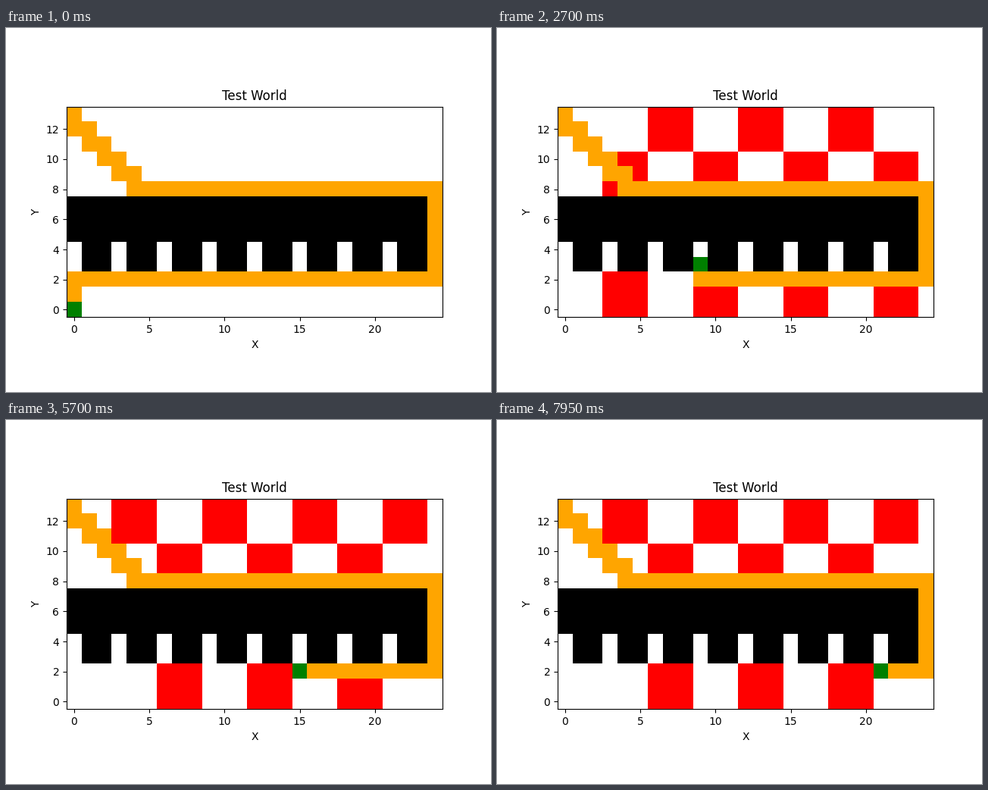
A matplotlib script that plays this animation: 640 by 480 pixels, repeating every 8 s.

```python
import numpy as np
import matplotlib.pyplot as plt
from matplotlib.animation import FuncAnimation
from matplotlib.colors import to_rgb

W, H = 25, 14
LOOP_MS, FRAME_MS, STEP_MS = 8000, 50, 150
PHASE, CYCLE = 5, 15  # steps per light phase, steps per full light cycle
LEAD = 2              # steps of the first cycle already gone at the start

WHITE, BLACK, RED, ORANGE, GREEN = map(
    to_rgb, ("white", "black", "red", "orange", "green"))


def build_route():
    """Cells from the lower left, around the wall, up to the upper left."""
    route = [(0, 0), (0, 1)]
    route += [(x, 2) for x in range(W)]
    route += [(W - 1, y) for y in range(3, 9)]
    route += [(x, 8) for x in range(W - 2, 3, -1)]
    for x in range(4, 0, -1):
        route += [(x, 13 - x), (x - 1, 13 - x)]
    return route + [(0, 13)]


def build_base():
    grid = np.empty((H, W, 3))
    grid[:] = WHITE
    grid[5:8, :24] = BLACK
    for x in range(24):
        if x % 3:
            grid[3:5, x] = BLACK
    return grid


def paint_lights(grid, phase):
    """Phase 0 is clear; phases 1 and 2 show opposite red blocks."""
    if phase == 0:
        return
    for block in range(1, 8):
        cols = slice(3 * block, 3 * block + 3)
        if block % 2 == phase % 2:
            grid[0:3, cols] = RED
            grid[8:11, cols] = RED
        else:
            grid[11:14, cols] = RED


def locate(step):
    """Return the position along the route and whether an alcove is used."""
    if step < PHASE + 3:
        return min(step, 4), False
    cycle, t = divmod(step + LEAD, CYCLE)
    x = 6 * cycle
    if t < PHASE:
        x += min(t, 3)
    elif t < 2 * PHASE:
        x += 3
    else:
        x += 3 + min(t - 2 * PHASE, 2)
    return x + 2, PHASE <= t < 2 * PHASE


ROUTE = build_route()
BASE = build_base()


def render(step):
    grid = BASE.copy()
    paint_lights(grid, (step + LEAD) // PHASE % 3)
    pos, hiding = locate(step)
    for x, y in ROUTE[pos:]:
        grid[y, x] = ORANGE
    x, y = ROUTE[pos]
    grid[y + hiding, x] = GREEN
    return grid


fig, ax = plt.subplots(figsize=(6.4, 4.8), dpi=100)
image = ax.imshow(render(0), origin="lower", interpolation="nearest")
ax.set_title("Test World")
ax.set_xlabel("X")
ax.set_ylabel("Y")


def update(frame):
    image.set_data(render(frame * FRAME_MS // STEP_MS))
    return [image]


anim = FuncAnimation(fig, update, frames=LOOP_MS // FRAME_MS,
                     interval=FRAME_MS, repeat=True, repeat_delay=0)
plt.show()
```
